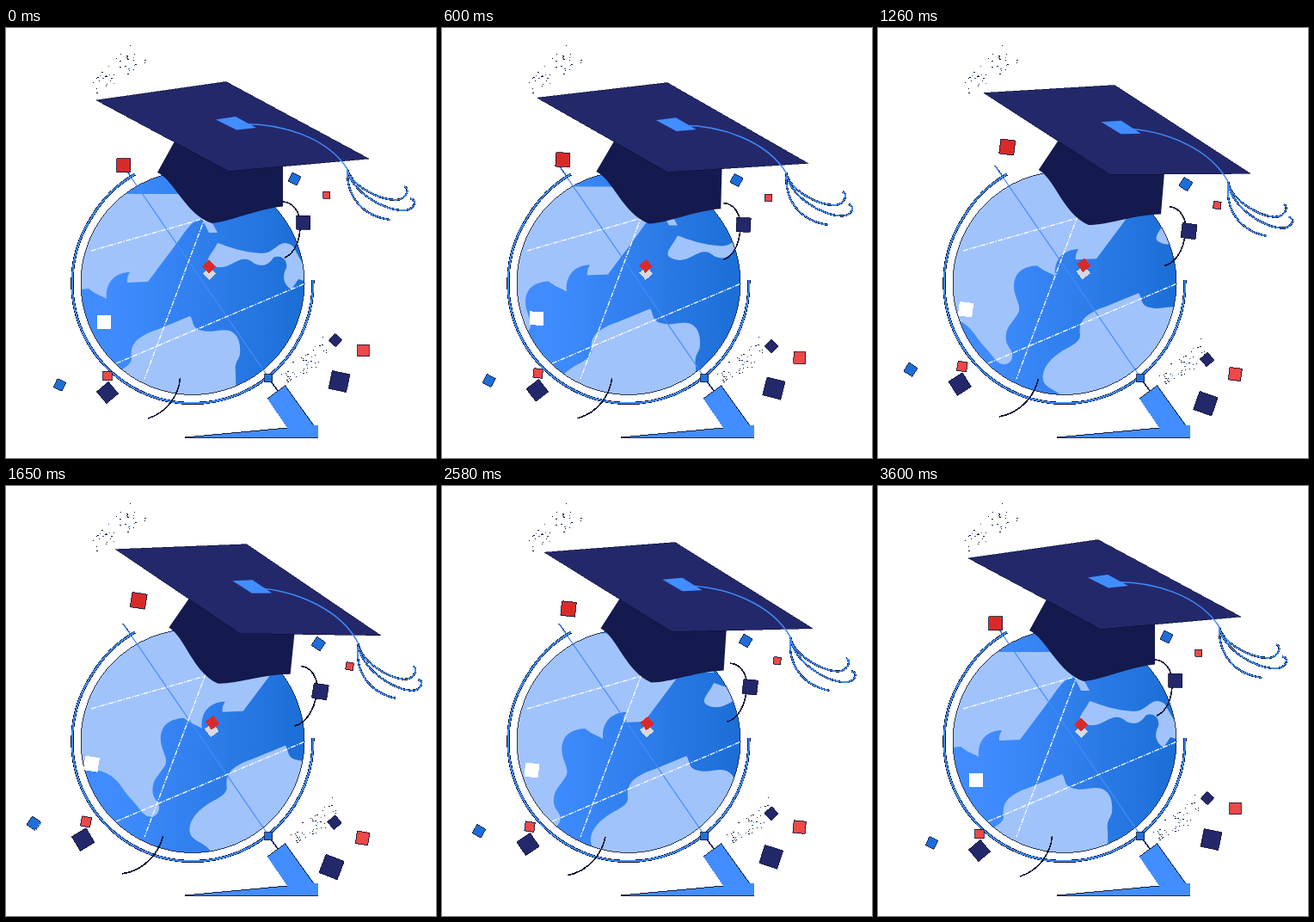
Animation of 500 by 500 pixels, one loop 3.63 s. Source, as an HTML page:

```html
<!DOCTYPE html>
<html lang="en">
<head>
<meta charset="utf-8">
<title>Globe with graduation cap</title>
<style>
html, body { margin: 0; width: 100%; height: 100%; overflow: hidden; background: #fff; }
svg { display: block; width: 100vw; height: 100vh; }
.crisp { shape-rendering: crispEdges; }
</style>
</head>
<body>
<svg viewBox="0 0 500 500">
  <defs>
    <linearGradient id="sea" gradientUnits="userSpaceOnUse" x1="87" y1="0" x2="347" y2="0">
      <stop offset=".15" stop-color="#408cff"/>
      <stop offset="1" stop-color="#1b6ed6"/>
    </linearGradient>
    <clipPath id="disc"><circle cx="217" cy="296.5" r="130"/></clipPath>
  </defs>

  <g id="dotsTop" class="crisp"></g>
  <g id="dotsLow" class="crisp"></g>

  <!-- globe -->
  <g clip-path="url(#disc)">
    <rect x="80" y="160" width="275" height="275" fill="url(#sea)"/>
    <g id="land" fill="#a1c3fc">
      <path d="M-60 186 L137 193 L200 193 L225 205 Q240 226 246 238 L236 238 L228 222
        C216 222 208 238 195 255 L165 295 L141 296 Q140 290 144 284
        C128 284 115 295 117 315 C110 311 103 309 96 303 C82 304 70 309 69 326 C69 342 80 350 73 360
        C66 371 58 376 60 391 C62 399 69 402 67 410 C65 419 54 421 47 412
        C38 400 33 396 27 388 C16 370 3 362 -20 363 L-60 363 Z"/>
      <path d="M246 250 C258 254 275 261 297 262 C311 262 315 250 325 250 Q334 251 336 258
        Q341 268 347 276 L352 296 L340 292 L332 304 C322 298 321 288 326 279 C328 268 318 263 311 267
        C305 276 298 278 289 274 C280 266 274 268 263 274 C254 279 245 280 237 275 C230 270 240 262 246 250 Z"/>
      <path d="M214 335 C219 341 215 350 229 352 C240 355 250 349 260 352 C270 356 273 366 272 379
        C271 386 265 389 267 400 L268 470 L127 470 L127 458 C120 447 106 447 103 436
        C101 424 110 413 120 406 C130 398 146 394 146 384 C144 371 150 364 156 360
        C162 356 168 353 175 351 L214 335 Z"/>
    </g>
  </g>
  <circle class="crisp" cx="217" cy="296.5" r="130" fill="none" stroke="#0b1030" stroke-width=".8"/>
  <path class="crisp" d="M136 160 L146 174 M308 411 L317 423" stroke="#14245c" stroke-width="1.6"/>
  <path d="M136 160 L305 406" stroke="#428dff" stroke-width="1.3"/>
  <g fill="none" stroke="#fff" stroke-width="1.3" stroke-dasharray="6 1.5 1.5 1.5">
    <path d="M99 259 L232 221"/>
    <path d="M232 219 L161 408"/>
    <path d="M128 390 L348 297"/>
  </g>
  <g id="ring" class="crisp" fill="none"></g>

  <!-- stand -->
  <g class="crisp">
    <path d="M304 431 L325 415.500 L358 461.500 H363 V476 H208 L327 465 Z" fill="#428dff"/>
    <path d="M363 476 H208 L327 465 M304 431 L325 415.500 L358 461.500" fill="none" stroke="#0b1030" stroke-width=".9"/>
    <rect x="300.5" y="402.5" width="9" height="9" fill="#1f73d9" stroke="#0b1030" stroke-width=".8"/>
  </g>

  <g id="confetti" class="crisp">
    <g fill="none" stroke="#0c1033" stroke-width="1.6">
      <path d="M202.500 407 C201 426 188 447 165 454"/>
      <path d="M321 202 C334 202 342 214 342 229 C342 247 336 262 324 267"/>
    </g>
  </g>

  <g id="cap">
    <path d="M197 130 L176 168 C196 177 208 216 239 227 C263 225 289 211 322 207.500 V150 Z" fill="#141a4e"/>
    <path class="crisp" d="M105 84 L256 62.500 L422 152 L259 166.500 Z" fill="#23286b" stroke="#0b1030" stroke-width=".6"/>
    <path d="M244 106.500 L267 103 L291 116 L268 118.500 Z" fill="#428dff"/>
    <path d="M268 112 C320 109 374 128 397 164" fill="none" stroke="#3f8af8" stroke-width="1.5"/>
    <g id="tassel" class="crisp" fill="none"></g>
  </g>
</svg>
<script>
const LOOP = 3630;
const NS = "http://www.w3.org/2000/svg";
const get = id => document.getElementById(id);
const add = (parent, tag, attrs) => {
  const el = document.createElementNS(NS, tag);
  for (const k in attrs) el.setAttribute(k, attrs[k]);
  return parent.appendChild(el);
};

// Blue line with a dark rim
function cord(id, d, rim, core) {
  add(get(id), "path", { d, stroke: "#0b1030", "stroke-width": rim });
  add(get(id), "path", { d, stroke: "#3d8bff", "stroke-width": core });
}
cord("ring", "M150 170 A140 140 0 0 0 99 221 A140 140 0 0 0 217 436.5 A140 140 0 0 0 357 293", 3.2, 2);
[
  "M397 164 C402 184 434 200 454 200 C466 199 470 186 463 184",
  "M397 164 C403 193 441 212 461 212 C474 213 480 200 470 198.5",
  "M397 165 C396 197 415 219 447 223"
].forEach(d => cord("tassel", d, 2.4, 1.5));

const RED = "#d92a2a", CORAL = "#ee4848", NAVY = "#23286b", BLUE = "#1c6fd8";
const bits = [
  // x, y, side, angle, fill
  [236.5, 285.5, 11, 45, "#d8d9e0"],
  [236, 277.5, 11, 45, RED],
  [136.5, 160, 16, 0, RED],
  [335.5, 175.5, 11, 25, BLUE],
  [372.5, 194, 8, 0, CORAL],
  [345.5, 226, 16, 0, NAVY],
  [114, 342, 15.5, 0, "#fff"],
  [118, 404.5, 10.5, 2, CORAL],
  [118, 424, 18, 50, NAVY],
  [62.5, 415, 11, 25, BLUE],
  [383, 363, 11, 42, NAVY],
  [415.5, 375, 13.5, 0, CORAL],
  [387.5, 411, 21, 12, NAVY]
];
bits.forEach(([x, y, s, a, fill], i) => add(get("confetti"), "rect", {
  x: x - s / 2, y: y - s / 2, width: s, height: s, fill,
  transform: `rotate(${a} ${x} ${y})`,
  stroke: i < 2 || fill === "#fff" ? "none" : "#0b1030", "stroke-width": .8
}));

// Fan of specks between two points
function spray(id, x0, y0, x1, y1, count, seed) {
  const rnd = () => (seed = seed * 16807 % 2147483647) / 2147483647;
  const dx = x1 - x0, dy = y1 - y0, len = Math.hypot(dx, dy);
  for (let i = 0; i < count; i++) {
    const u = rnd(), off = (rnd() - .5) * (14 + 16 * u);
    add(get(id), "rect", {
      x: Math.round(x0 + dx * u - dy / len * off),
      y: Math.round(y0 + dy * u + dx / len * off),
      width: rnd() < .3 ? 2 : 1, height: 1,
      fill: rnd() < .15 ? "#2c64b8" : "#0c1033"
    });
  }
}
spray("dotsTop", 101, 70, 155, 28, 44, 4711);
spray("dotsLow", 321, 406, 377, 369, 44, 9173);

const wave = t => (1 - Math.cos(2 * Math.PI * t / LOOP)) / 2;

function draw(t) {
  const p = wave(t);
  get("land").setAttribute("transform", `translate(${113 * p} ${-34 * p})`);
  get("cap").setAttribute("transform", `rotate(${6 * p} 217 297)`);
  get("confetti").setAttribute("transform",
    `translate(239.5 303.2) rotate(${9.25 * p}) scale(${1 + .079 * p}) translate(-239.5 -303.2)`);
  const q = wave(t - 300);
  get("dotsLow").setAttribute("transform", `translate(${14 * q} ${4 * q})`);
}

const start = performance.now();
function tick() {
  draw((performance.now() - start) % LOOP);
  requestAnimationFrame(tick);
}
draw(0);
requestAnimationFrame(tick);
</script>
</body>
</html>
```
